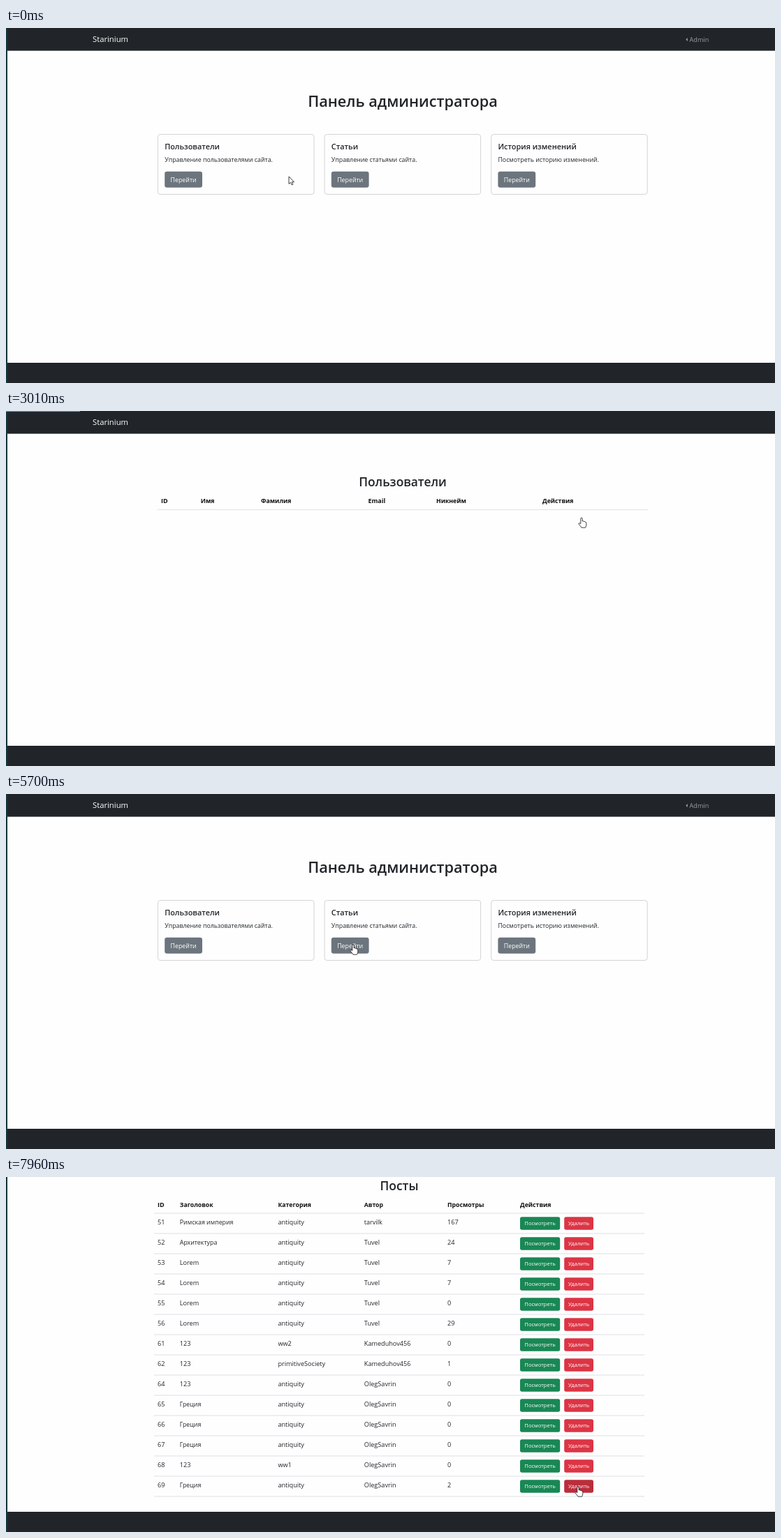
Recreate the animation shown at these times as an HTML page. Size 1101 by 509 pixels, loop 8 s.

```html
<!DOCTYPE html>
<html lang="ru">
<head>
<meta charset="utf-8">
<title>Панель администратора</title>
<style>
  html, body { margin: 0; width: 100%; height: 100%; overflow: hidden; background: #fefefe; }
  svg { display: block; width: 100vw; height: 100vh; }
  text { font-family: "Open Sans", "Noto Sans", sans-serif; fill: #212529; white-space: pre; }
  .head { font-weight: 600; }
  .th { font-weight: 700; fill: #111; }
  .light { fill: #fff; }
  .muted { fill: #9b9d9f; }
  .cursor { fill: #fff; stroke: #111; stroke-width: .8; stroke-linejoin: round; }
</style>
</head>
<body>
<svg id="stage" viewBox="0 0 1101 509"></svg>
<script>
const LOOP = 8000;
const DARK = '#212529', GREY = '#6c757d', GREEN = '#198754', RED = '#dc3545', RED_HOVER = '#bb2d3b';
const ROW = 29;

// ---------- drawing helpers ----------
const rect = (x, y, w, h, fill, more = '') =>
  `<rect x="${x}" y="${y}" width="${w}" height="${h}" fill="${fill}" ${more}/>`;

// Cyrillic letters run wider in this face, so they are set a little smaller
const text = (x, y, str, size, cls = '', anchor = 'start') => {
  const px = size * (/[а-я]/i.test(str) ? .908 : .94);
  return `<text x="${x}" y="${y}" font-size="${px.toFixed(2)}" class="${cls}" text-anchor="${anchor}">${str}</text>`;
};

const button = (x, y, w, h, label, size, fill, id = '') =>
  rect(x, y, w, h, fill, `rx="${h / 7}" ${id && `id="${id}"`}`) +
  text(x + w / 2, y + h / 2 + size * .34, label, size, 'light', 'middle');

const line = (x, y) => rect(x, y, 702, 1, '#dee2e6');

const group = (id, body) => `<g id="${id}" display="none">${body}</g>`;

// ---------- pages ----------
const cards = [
  ['Пользователи', 'Управление пользователями сайта.'],
  ['Статьи', 'Управление статьями сайта.'],
  ['История изменений', 'Посмотреть историю изменений.']
];

function panel() {
  return text(568, 113, 'Панель администратора', 23.9, 'head', 'middle') +
    cards.map(([title, note], i) => {
      const x = 217.5 + i * 238.6;
      return rect(x, 152.5, 223.5, 86, 'none', 'rx="3.5" stroke="#d3d4d5"') +
        text(x + 9.7, 174, title, 12, 'head') +
        text(x + 9.7, 192.3, note, 9.72) +
        button(x + 9.7, 205.7, 53.8, 23, 'Перейти', 9.72, GREY);
    }).join('') +
    rect(0, 480, 1101, 29, DARK);
}

function table(title, left, cols, heads, rows, actions, id) {
  let out = text(left + 351, 108, title, 19.15, 'head', 'middle') + line(left, 141);
  heads.forEach((h, i) => out += text(cols[i], 132.4, h, 9.6, 'th'));
  rows.forEach((row, r) => {
    const y = 141 + r * ROW;
    row.forEach((cell, i) => out += text(cols[i], y + 16.4, cell, 9.72));
    actions.forEach(([x, w, label, fill], i) =>
      out += button(x, y + 5.8, w, 18.4, label, 8.4, fill, i ? `${id}-del-${r}` : ''));
    out += line(left, y + ROW);
  });
  return out;
}

const userHeads = ['ID', 'Имя', 'Фамилия', 'Email', 'Никнейм', 'Действия'];
const userCols = [217, 256.8, 328.8, 424, 575, 721];
const wideCols = [222, 278.8, 365, 518.4, 616, 768];
const userActions = [[721.2, 68.4, 'Редактировать', GREY], [795.8, 41.7, 'Удалить', RED]];

const users = first => Array.from({ length: 14 }, (_, i) => {
  const id = first + i;
  return id === 156
    ? [id, 'Лемар', 'Лемаров', 'lemar@lem.test', 'LEMARUX']
    : [id, 'Tuvel', 'nomtelu', 'kula@da.test', 'kumek7ccccc44@zu'];
});

const postHeads = ['ID', 'Заголовок', 'Категория', 'Автор', 'Просмотры', 'Действия'];
const postCols = [217, 248.8, 389.4, 512.8, 632, 736];
const postActions = [[736, 57.2, 'Посмотреть', GREEN], [799.2, 41.8, 'Удалить', RED]];
const OLD = 'antiquity', A = 'tarvilk', B = 'Tuvel', C = 'Kameduhov456', D = 'OlegSavrin';
const posts = [
  [51, 'Римская империя', OLD, A, 167],
  [52, 'Архитектура', OLD, B, 24],
  [53, 'Lorem', OLD, B, 7],
  [54, 'Lorem', OLD, B, 7],
  [55, 'Lorem', OLD, B, 0],
  [56, 'Lorem', OLD, B, 29],
  [61, '123', 'ww2', C, 0],
  [62, '123', 'primitiveSociety', C, 1],
  [64, '123', OLD, D, 0],
  [65, 'Греция', OLD, D, 0],
  [66, 'Греция', OLD, D, 0],
  [67, 'Греция', OLD, D, 0],
  [68, '123', 'ww1', D, 0],
  [69, 'Греция', OLD, D, 2]
];

const usersPage = (id, first) =>
  group(id, table('Пользователи', 212, userCols, userHeads, users(first), userActions, id));

const stage = document.getElementById('stage');
stage.innerHTML =
  rect(0, 0, 1101, 509, '#fefefe') +
  '<g id="scene">' +
    rect(0, 0, 1101, 32.6, DARK) +
    text(124, 20.4, 'Starinium', 12, 'light') +
    '<g id="admin"><path d="M2.8 13.9V18.9L.3 16.4Z" fill="#9b9d9f"/>' +
      text(5.6, 19.6, 'Admin', 9.72, 'muted') + '</g>' +
    group('panel', panel()) +
    group('blank', table('Пользователи', 217, wideCols, userHeads, [], []) + rect(0, 480, 1101, 29, DARK)) +
    usersPage('before', 156) +
    usersPage('after', 157) +
    group('posts', table('Посты', 212, postCols, postHeads, posts, postActions, 'posts') +
      rect(0, 569.5, 1101, 29, DARK)) +
  '</g>' +
  rect(0, 0, 2, 509, '#16363d') +
  rect(0, 0, 0, 1, '#b8930f', 'id="bar"') +
  '<path id="arrow" class="cursor" d="M0 0V10.6L2.5 8.4L4.2 12L5.9 11.2L4.3 7.8H7.5Z"/>' +
  '<path id="hand" class="cursor" d="M-1.2 8.5V1.2C-1.2-.3 1.2-.3 1.2 1.2V5C2 4.4 3.2 4.6 3.4 5.6C4.2 5 5.2 5.4 5.3 6.3' +
    'C6.2 5.9 6.8 6.6 6.8 7.5V10.5C6.8 12 6 13 5.6 14.2H0C-1 12.4-3 10.6-4 9C-4.6 7.8-3 7.2-2.2 8Z"/>';

// ---------- timeline ----------
// runs of screen updates: first, last, count
const runs = [
  [0, 0, 1], [150, 450, 3], [850, 1000, 2], [1120, 1810, 6], [1930, 2340, 4],
  [2890, 3010, 2], [3160, 3880, 6], [4030, 4830, 6], [4980, 4980, 1],
  [5100, 6090, 8], [6210, 6690, 5], [6840, 7140, 3], [7260, 7960, 6]
];
const ticks = runs.flatMap(([a, b, n]) =>
  Array.from({ length: n }, (_, i) => a + (b - a) * i / Math.max(1, n - 1)));

const pages = [[0, 'panel'], [850, 'before'], [2890, 'blank'], [3160, 'after'], [4830, 'panel'], [5800, 'posts']];
const adminOff = [[2890, 3160], [4830, 5100]];
const handOn = [[450, 1000], [2200, 3300], [4000, 4600], [5500, 6200], [7800, LOOP]];
const hovers = [['before-del-0', 2200, 2890], ['posts-del-13', 7800, LOOP]];

const path = [
  [0, 405, 213], [150, 380, 219], [300, 300, 226], [450, 265, 225], [1000, 265, 225],
  [1810, 771, 204], [2300, 824, 153], [3160, 824, 153], [3880, 975, 40], [4030, 991, 19],
  [4230, 991, 19], [4700, 931, 17], [4980, 931, 17], [5600, 497, 216], [6210, 497, 216],
  [6570, 622, 238], [6690, 622, 238], [7140, 651, 275], [7900, 819, 444]
];
const bars = [
  [[850, 242], [1258, 1101], [1300, 1101]],
  [[2890, 50], [3010, 106], [3160, 242], [3592, 1101]],
  [[4830, 50], [4980, 106], [5100, 242], [5524, 1101]],
  [[5800, 242], [6090, 1101]]
];
const scroll = [[6690, 0], [7000, 89.5]];

const linear = k => k;
const smooth = k => k * k * (3 - 2 * k);

function at(keys, t, ease, col = 1) {
  const next = keys.findIndex(k => k[0] > t);
  if (next === 0) return keys[0][col];
  if (next < 0) return keys[keys.length - 1][col];
  const a = keys[next - 1], b = keys[next];
  return a[col] + (b[col] - a[col]) * ease((t - a[0]) / (b[0] - a[0]));
}
const last = (list, t) => list.filter(v => v <= t).pop();
const within = (spans, t) => spans.some(([a, b]) => t >= a && t < b);

const el = id => document.getElementById(id);
const show = (id, on) => el(id).setAttribute('display', on ? 'inline' : 'none');
const move = (id, x, y) => el(id).setAttribute('transform', `translate(${x.toFixed(1)} ${y.toFixed(1)})`);

function draw(t) {
  const page = pages.filter(p => p[0] <= t).pop()[1];
  new Set(pages.map(p => p[1])).forEach(id => show(id, id === page));
  move('scene', 0, -at(scroll, t, smooth));

  show('admin', !within(adminOff, t));
  move('admin', page === 'panel' ? 973 : 962.6, 0);

  const load = bars.find(b => t >= b[0][0] && t <= b[b.length - 1][0]);
  el('bar').setAttribute('width', load ? at(load, t, linear) : 0);

  const hand = within(handOn, t);
  show('hand', hand);
  show('arrow', !hand);
  move(hand ? 'hand' : 'arrow', at(path, t, smooth), at(path, t, smooth, 2));

  hovers.forEach(([id, a, b]) => el(id).setAttribute('fill', t >= a && t < b ? RED_HOVER : RED));
}

const start = performance.now();
let shown = -1;
function frame() {
  const tick = last(ticks, (performance.now() - start) % LOOP);
  if (tick !== shown) draw(shown = tick);
  requestAnimationFrame(frame);
}
frame();
</script>
</body>
</html>
```
